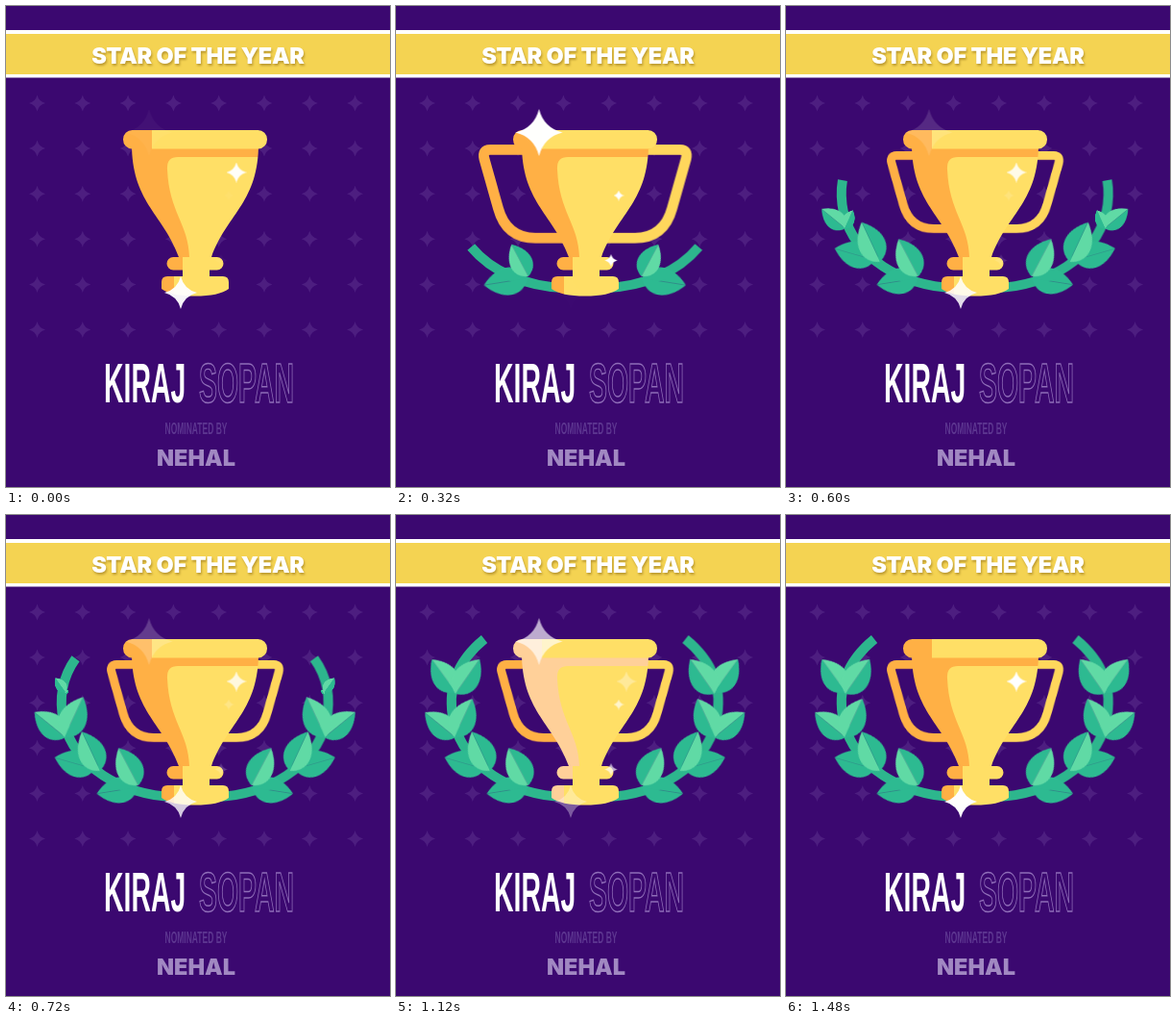
These frames come from a looping animation (400 px wide and 500 px high, 1.52 s). An HTML page:

```html
<!DOCTYPE html>
<html lang="en">
<head>
<meta charset="utf-8">
<title>Star of the year</title>
<style>
  html, body { margin: 0; width: 100%; height: 100%; overflow: hidden; background: #3b0870; }
  svg { display: block; width: 400px; height: 500px; }
  .anim { animation: 1.52s linear infinite; }
  .wide { font: 900 23.5px Inter, "Open Sans", sans-serif; text-anchor: middle; }
  .title { fill: #fff; filter: drop-shadow(1.5px 2px 1px rgba(140, 105, 20, .55)); }
  .name { font: 700 58px "Liberation Sans", Arial, sans-serif; }
  .outline { fill: none; stroke: #8f6db8; stroke-width: 1.5; }
  .note { font: 700 16px "Liberation Sans", Arial, sans-serif; fill: #5d3690; text-anchor: middle; }
  .stem { fill: none; stroke: #2db68d; stroke-width: 10; stroke-dasharray: 1 2; animation-name: grow; }
  .handles { fill: none; stroke-width: 9; transform-origin: 197px 185px; animation-name: spring; }
  .on { fill: #fff; animation-name: twinkle; }
  .off { fill: #fff; animation-name: twinkle-back; }
  .shade { fill: #ffb045; animation-name: glow; }

  @keyframes grow {
    0% { stroke-dashoffset: 1; }
    21% { stroke-dashoffset: .56; }
    31.6% { stroke-dashoffset: .4; }
    47.4% { stroke-dashoffset: .115; }
    55%, 100% { stroke-dashoffset: 0; }
  }
  @keyframes spring {
    0%, 5% { transform: scale(0); animation-timing-function: ease-out; }
    20% { transform: scale(1.21); animation-timing-function: ease-in-out; }
    34%, 100% { transform: scale(1); }
  }
  @keyframes twinkle {
    0%, 100% { opacity: .04; }
    21%, 66% { opacity: 1; }
    42.5%, 89%, 97% { opacity: 0; }
  }
  @keyframes twinkle-back {
    0%, 100% { opacity: .96; }
    21%, 66% { opacity: 0; }
    42.5%, 89%, 97% { opacity: 1; }
  }
  @keyframes glow {
    0%, 51%, 97%, 100% { fill: #ffb045; }
    74% { fill: #ffd09a; }
  }
</style>
</head>
<body>
<svg viewBox="0 0 400 500">
  <defs>
    <path id="spark" d="M0-1Q.2-.2 1 0Q.2.2 0 1Q-.2.2-1 0Q-.2-.2 0-1Z"/>
    <path id="half" d="M0 0C-16-6-19-25 0-42Z"/>
    <path id="handle" d="M150 155.500H115Q108 155.500 110 163.500L122 206Q129 231.500 154 231.500H184"/>
    <clipPath id="cup">
      <rect x="122" y="129" width="150" height="19.500" rx="9.500"/>
      <path d="M131 146C132 206 166 218 181 264H213C228 218 262 206 263 146Z"/>
      <rect x="167.500" y="261" width="59" height="13.500" rx="6.700"/>
      <rect x="184" y="272" width="28" height="12"/>
      <path d="M168 281H226Q232 281 232 287V294Q222 301.500 197 301.500T162 294V287Q162 281 168 281Z"/>
    </clipPath>
  </defs>

  <rect width="400" height="500" fill="#3b0870"/>
  <g id="grid" fill="#4d1e80"></g>
  <rect y="25" width="400" height="49.500" fill="#fff"/>
  <rect y="29" width="400" height="42" fill="#f4d352"/>
  <text class="wide title" x="200" y="60" letter-spacing="-.2">STAR OF THE YEAR</text>

  <g id="left"></g>
  <g id="right" transform="translate(393.500) scale(-1 1)"></g>

  <g class="handles anim">
    <use href="#handle" stroke="#ffb045"/>
    <use href="#handle" stroke="#ffd75c" transform="translate(394) scale(-1 1)"/>
  </g>

  <g clip-path="url(#cup)">
    <rect class="shade anim" x="120" y="125" width="155" height="180"/>
    <path fill="#ffdf66" d="M152 125H275V148.500H152Z
      M270 157H179Q167 157 168 170C170 215 190 226 191 261H270Z
      M184 261H230V281H184Z M175 281H235V305H175Z"/>
  </g>
  <g id="sparks"></g>

  <text class="name" fill="#fff" transform="translate(102 411.500) scale(.49 1)">KIRAJ</text>
  <text class="name outline" transform="translate(201 411.500) scale(.49 1)">SOPAN</text>
  <text class="note" transform="translate(198 444.500) scale(.53 1)">NOMINATED BY</text>
  <text class="wide" x="198" y="477.500" fill="#a188c2">NEHAL</text>
</svg>
<script>
  const LOOP = 1520;
  const byId = id => document.getElementById(id);
  const spark = (x, y, r, cls = '') =>
    `<use href="#spark" class="${cls}" transform="translate(${x} ${y}) scale(${r})"/>`;

  let grid = '';
  for (let row = 0; row < 6; row++)
    for (let col = 0; col < 8; col++)
      grid += spark(32.5 + col * 47.3, 101 + row * 47.1, 8.5);
  byId('grid').innerHTML = grid;

  byId('sparks').innerHTML =
    spark(149, 131.5, 24.5, 'on anim') + spark(232, 197, 5.5, 'on anim') +
    spark(224, 264.5, 6.5, 'on anim') + spark(240, 173, 10.5, 'off anim') +
    spark(182, 298, 17, 'off anim');

  // x, y, angle, length: outer then inner leaf of each pair
  const leaves = [
    [137, 283, -99, 43], [138, 281, -28, 44],
    [93, 264, -74, 44], [98, 266, -25, 45],
    [62, 231, -51, 41], [61, 231, 25, 44],
    [62, 184, -36, 42], [62, 186, 35, 44]
  ];
  const DARK = '#2dba91', LIGHT = '#60daa5';
  const pct = ms => (ms / LOOP * 100).toFixed(2) + '%';
  let rules = '';
  let wreath = '<path class="stem anim" pathLength="1" d="M175 293C120 291 72 262 60 215C52 178 66 150 92 129"/>';
  leaves.forEach(([x, y, angle, len], i) => {
    const inner = i % 2;
    const start = 170 + 165 * (i >> 1) + 40 * inner;
    rules += `@keyframes pop${i} {
      0%, ${pct(start)} { transform: scale(0); }
      ${pct(start + 140)} { transform: scale(1.08); }
      ${pct(start + 240)}, 100% { transform: scale(1); }
    }`;
    // leaves that lie flat get no light
    const lit = angle > -60 ? LIGHT : DARK;
    const [left, right] = inner ? [lit, DARK] : [DARK, lit];
    wreath += `<g transform="translate(${x} ${y}) rotate(${angle}) scale(${len / 42})">
      <g class="anim" style="animation-name: pop${i}">
        <use href="#half" fill="${left}"/>
        <use href="#half" fill="${right}" transform="scale(-1 1)"/>
      </g></g>`;
  });
  document.head.appendChild(document.createElement('style')).textContent = rules;
  byId('left').innerHTML = byId('right').innerHTML = wreath;
</script>
</body>
</html>
```
